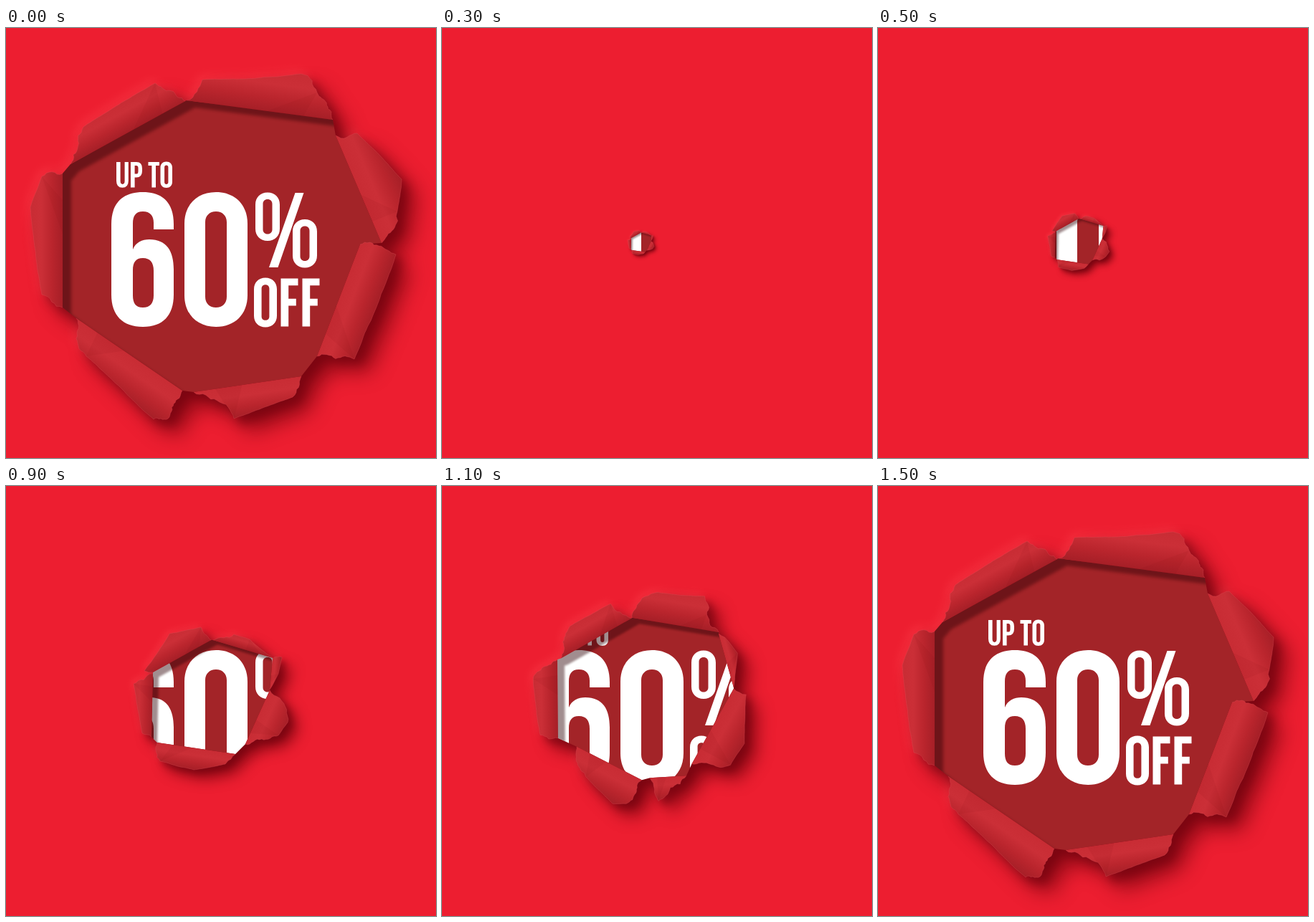
An HTML page that plays this animation: 600x600 px, repeating every 3000 ms.

```html
<!DOCTYPE html>
<html lang="en">
<head>
<meta charset="utf-8">
<title>Up to 60% off</title>
<style>
html, body { margin: 0; width: 100%; height: 100%; overflow: hidden; background: #ed1e30; }
svg { display: block; width: 100vw; height: 100vh; }
</style>
</head>
<body>
<svg id="stage" viewBox="0 0 600 600" role="img" aria-label="UP TO 60% OFF">
  <defs id="defs"></defs>
  <rect width="600" height="600" fill="#ed1e30"/>
</svg>
<script>
const NS = 'http://www.w3.org/2000/svg';
const stage = document.getElementById('stage');
const defs = document.getElementById('defs');

function add(parent, tag, attrs) {
  const el = document.createElementNS(NS, tag);
  for (const key in attrs) el.setAttribute(key, attrs[key]);
  return parent.appendChild(el);
}

// ---- lettering ----
const box = (x, y, w, h) => `M${x} ${y}h${w}v${h}h${-w}z`;

function pill(x, y, w, h) {
  const r = w / 2, c = r * 0.4, v = h - 2 * r;
  return `M${x} ${y + r}C${x} ${y + c} ${x + c} ${y} ${x + r} ${y}` +
    `S${x + w} ${y + c} ${x + w} ${y + r}v${v}` +
    `C${x + w} ${y + h - c} ${x + w - c} ${y + h} ${x + r} ${y + h}` +
    `S${x} ${y + h - c} ${x} ${y + r + v}z`;
}

const ring = (x, y, w, h, sx, sy) =>
  pill(x, y, w, h) + pill(x + sx, y + sy, w - 2 * sx, h - 2 * sy);

const letterF = x => `M${x} 349.5h24v9.7h-13.3v18.5h10.6v9.7h-10.6v29.1h-10.7z`;

const lettering = [
  // UP TO
  'M154 187h5.6v26.5q0 4.4 3 4.4t3-4.4v-26.5h5.2v26.2q0 9.6-8.4 9.6t-8.4-9.6z',
  'M174 187h8q8 0 8 9v3.6q0 9-8 9h-2.4v13.9h-5.6zM179.6 192v11.5h2.3q2.6 0 2.6-3.6v-4.3q0-3.6-2.6-3.6z',
  'M198.5 187h15.4v5.1h-4.9v30.4h-5.6v-30.4h-4.9z',
  ring(215.5, 186.6, 16.5, 36.4, 5.6, 5),
  // 60
  'M147 274C147 245 162 229 191 229S234 245 234 274V281H206V272C206 262 201 256 191 256S177 262 177 273V309' +
  'C181 299 190 295 200 295C224 295 234 311 234 337V372C234 401 219 417 191 417S147 401 147 372z' +
  'M177 338V373C177 384 181 390 191 390S206 384 206 373V339C206 327 201 321 191 321S177 327 177 338z',
  ring(249, 229, 88, 188, 29, 27),
  // percent
  ring(348, 229.5, 34, 67.5, 10.5, 9.5),
  ring(400, 267, 34, 67.5, 10.5, 9.5),
  'M403.5 230h12L379.5 334h-12.5z',
  // OFF
  ring(346, 348.5, 32, 69, 10.6, 9.7),
  letterF(383.5),
  letterF(413.5)
].join('');
add(defs, 'path', { id: 'words', d: lettering, fill: '#fff', 'fill-rule': 'evenodd' });

// ---- torn paper: per flap the two ends of the fold, then the outer corners back to the start ----
const small = {
  pivot: [276, 300],
  flaps: [
    '203,350 205,262 178,276 190,345',
    '205,260 286,215 272,197 228,206 193,258',
    '289,215 372,240 340,214 318,207',
    '372,241 368,284 380,262 385,239',
    '368,285 334,360 380,348 393,330 382,296',
    '320,374 211,358 215,384 262,396 306,388'
  ]
};
const wide = {
  pivot: [308, 327],
  flaps: [
    '113,360 112,214 67,250 80,354',
    '118,212 250,137 211,110 135,152',
    '251,136 412,163 390,130 386,96 305,90 262,110',
    '412,166 440,266 447,202 432,182',
    '440,268 362,408 434,410 460,370 463,279',
    '352,430 284,434 300,477 322,452',
    '269,438 148,376 165,432 215,482 240,482'
  ]
};
const full = {
  pivot: [300, 300],
  flaps: [
    '79,390 79,203 50,207 34,250 50,372',
    '90,190 250,102 208,77 108,138',
    '252,101 456,128 434,90 412,64 274,72',
    '460,150 524,300 546,256 552,211 490,147',
    '494,302 434,458 486,462 544,316',
    '412,486 262,508 318,545 400,515',
    '246,506 98,405 112,458 206,546 226,545'
  ]
};
const steps = [
  [small, 0.17], [small, 0.4], [small, 0.62], [small, 1],
  [wide, 0.75], [wide, 1], [full, 1]
];

let seed = 7;
function noise() {
  seed = (seed * 16807) % 2147483647;
  return seed / 2147483647 * 2 - 1;
}

const mix = (a, b, t) => [a[0] + (b[0] - a[0]) * t, a[1] + (b[1] - a[1]) * t];
const line = pts => 'M' + pts.map(p => p.map(v => v.toFixed(1)).join(' ')).join('L');
const shape = pts => line(pts) + 'z';

// Midpoint displacement; returns the points from a up to, but without, b.
function rough(a, b, amount) {
  const dx = b[0] - a[0], dy = b[1] - a[1];
  if (Math.hypot(dx, dy) < 5) return [a];
  const m = mix(a, b, 0.5), n = noise() * amount;
  const p = [m[0] - dy * n, m[1] + dx * n];
  return [...rough(a, p, amount), ...rough(p, b, amount)];
}

// Ragged where the paper tore, nearly smooth where it rolls parallel to the fold.
function tear(pts, dir) {
  return pts.slice(1).flatMap((b, i) => {
    const a = pts[i], dx = b[0] - a[0], dy = b[1] - a[1];
    const along = Math.abs(dx * dir[0] + dy * dir[1]) / Math.hypot(dx, dy);
    return rough(a, b, along > 0.85 ? 0.02 : 0.16);
  }).concat([pts[pts.length - 1]]);
}

function makeFlap(text, pivot, scale, id) {
  const pts = text.split(' ').map(pair => mix(pivot, pair.split(',').map(Number), scale));
  const [a, b, ...outer] = pts;
  const len = Math.hypot(b[0] - a[0], b[1] - a[1]);
  const dir = [(b[0] - a[0]) / len, (b[1] - a[1]) / len];
  const out = [dir[1], -dir[0]], mid = mix(a, b, 0.5);
  const reach = Math.max(...outer.map(p => (p[0] - a[0]) * out[0] + (p[1] - a[1]) * out[1]));
  const grad = add(defs, 'linearGradient', {
    id, gradientUnits: 'userSpaceOnUse', x1: mid[0], y1: mid[1],
    x2: mid[0] + out[0] * reach, y2: mid[1] + out[1] * reach
  });
  // light comes from the upper left
  const tones = ['#a61f27', '#ba252d', '#cb2f37', '#c82c34'];
  if (out[0] + out[1] > 0) tones.reverse();
  tones.forEach((color, i) => add(grad, 'stop', { offset: i / 3, 'stop-color': color }));
  const edge = tear([b, ...outer, a], dir);
  return { a, b, id, edge, d: shape(edge), crease: shape([mix(a, b, 0.55), mix(a, b, 0.8), outer[0]]) };
}

function blur(id, amount) {
  const f = add(defs, 'filter', {
    id, filterUnits: 'userSpaceOnUse', x: -100, y: -100, width: 800, height: 800,
    'color-interpolation-filters': 'sRGB'
  });
  add(f, 'feGaussianBlur', { stdDeviation: amount });
}

function buildStep([{ flaps, pivot }, scale], n) {
  const depth = Math.min(1, (n + 1) / 6);
  const g = add(stage, 'g', { display: 'none' });
  const parts = flaps.map((text, i) => makeFlap(text, pivot, scale, `paper${n}-${i}`));
  const hole = shape(parts.flatMap(p => [p.a, p.b]));
  const whole = hole + parts.map(p => p.d).join('');
  blur('wide' + n, 15 * depth);
  blur('near' + n, 7 * depth);
  blur('edge' + n, 1 + depth);
  add(add(defs, 'clipPath', { id: 'hole' + n }), 'path', { d: hole });

  const cast = (fill, opacity, shift, soft) => add(g, 'path', {
    d: whole, fill, opacity, filter: `url(#${soft}${n})`,
    transform: `translate(${shift * depth} ${shift * depth})`
  });
  cast('#ff4650', 0.4, -5, 'near');
  cast('#78040f', 0.8, 20, 'wide');
  cast('#68000c', 0.5, 9, 'near');

  const inside = add(g, 'g', { 'clip-path': `url(#hole${n})` });
  add(inside, 'rect', { width: 600, height: 600, fill: '#a32428' });
  add(inside, 'use', { href: '#words' });
  add(inside, 'path', {
    d: box(-90, -90, 780, 780) + hole, 'fill-rule': 'evenodd',
    fill: '#300408', opacity: 0.45, filter: `url(#edge${n})`,
    transform: `translate(${12 * depth} ${10 * depth})`
  });

  for (const p of parts) {
    add(g, 'path', { d: p.d, fill: `url(#${p.id})` });
    add(g, 'path', { d: p.crease, fill: '#60000a', opacity: 0.06 });
    add(g, 'path', {
      d: line(p.edge), fill: 'none', stroke: '#e0505a',
      'stroke-width': 0.8, 'stroke-linejoin': 'round', opacity: 0.4
    });
  }
  return g;
}

const views = steps.map(buildStep);
const LOOP = 3000, FIRST = 300, STEP = 200, last = steps.length - 1;

function render(t) {
  const i = t < 100 ? last : Math.min(last, Math.floor((t - FIRST) / STEP));
  views.forEach((v, n) => v.setAttribute('display', n === i ? 'inline' : 'none'));
}

function tick() {
  render(performance.now() % LOOP);
  requestAnimationFrame(tick);
}
tick();
</script>
</body>
</html>
```
